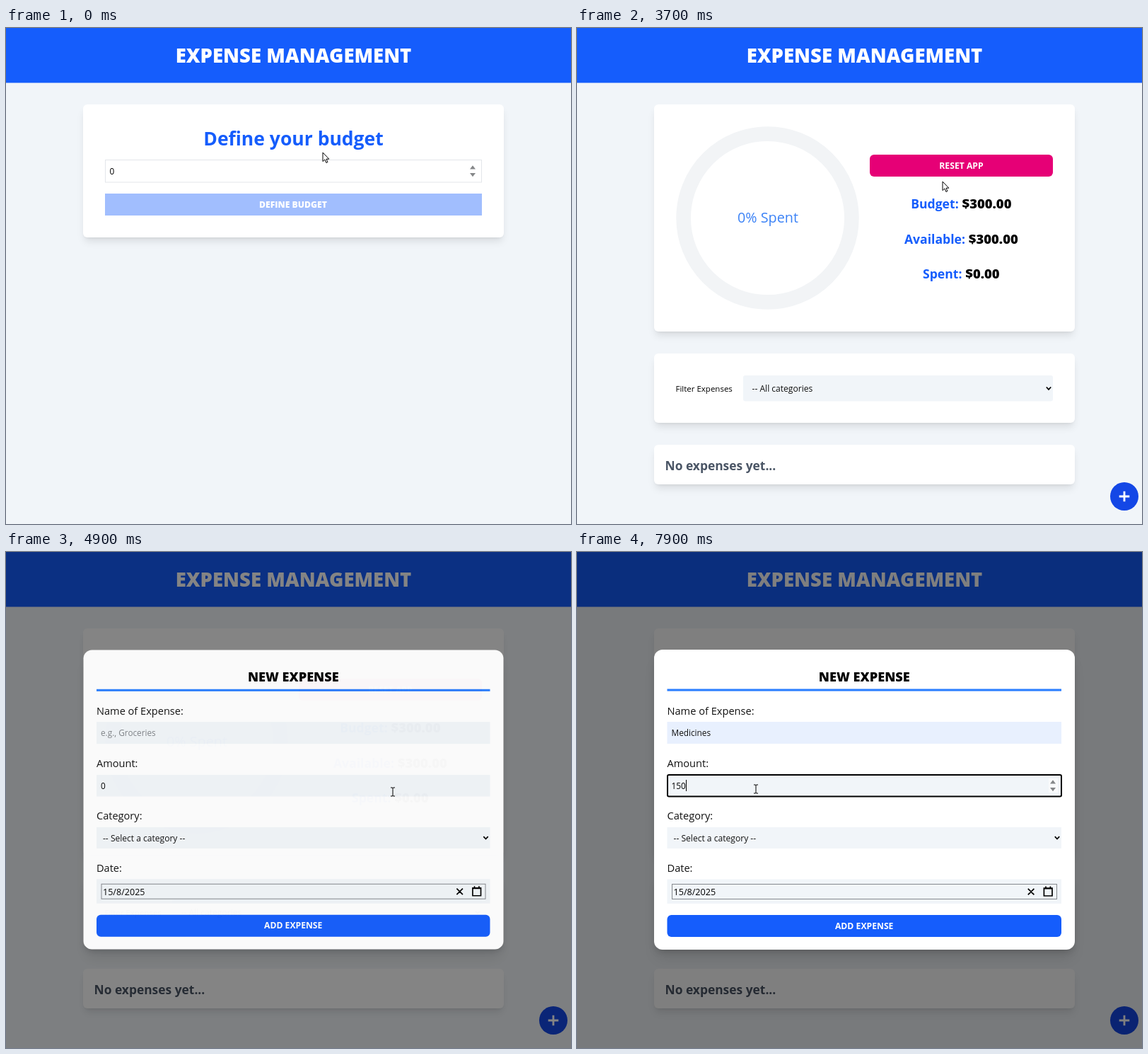
Write an HTML page that moves like this. It is 799 by 701 pixels and loops after 8 s.

```html
<!DOCTYPE html>
<html lang="en">
<head>
<meta charset="utf-8">
<title>Expense Management</title>
<style>
  html, body { margin: 0; width: 100%; height: 100%; overflow: hidden; background: #f1f5f9; }
  #stage { position: relative; width: 799px; height: 701px; overflow: hidden; }
  section, svg, .shade { position: absolute; left: 0; top: 0; width: 799px; height: 701px; }
  .card {
    position: absolute; left: 109px; width: 595px; border-radius: 6px; background: #fff;
    box-shadow: 0 7.8px 11.6px -2.3px #0000001a, 0 3.1px 4.7px -3.1px #0000001a;
  }
  .shade { background: #000; }
  #dialog { transform-origin: 406.5px 350px; }
  #dialog .card {
    border-radius: 12px;
    box-shadow: 0 15px 19px -4px #0000001a, 0 6px 8px -5px #0000001a;
  }
  text { font: 400 11.8px "Open Sans", "Noto Sans", sans-serif; white-space: pre; }
  .mid { text-anchor: middle; }
  .black { font-weight: 800; }
  .bold { font-weight: 700; }
  .h1 { font-size: 27.5px; fill: #fff; }
  .h2 { font-size: 26.5px; fill: #155dfc; }
  .h3 { font-size: 18.2px; }
  .btn { font-size: 12.2px; fill: #fff; }
  .sum { font-size: 18.4px; }
  .sum .bold { font-size: 17.6px; fill: #155dfc; }
  .label { font-size: 14.6px; fill: #111; }
  .opt { font-size: 12.1px; fill: #111; }
  .pop text { font-size: 9.3px; font-weight: 600; fill: #fff; }
  .blue { fill: #155dfc; }
  .field { fill: #f1f5f9; }
  .focus { fill: none; stroke: #000; stroke-width: 2; }
  .line { fill: none; stroke: #000; stroke-width: 1.7; }
  .caret { width: 1px; height: 16px; }
  .spin { fill: #858789; }
  #cursor path { stroke: #000; fill: #fff; stroke-width: 1; stroke-linejoin: round; }
</style>
</head>
<body>
<div id="stage">
  <svg>
    <defs>
      <path id="arrows" d="M-4 -2.7h8L0 -8zM-4 2.7h8L0 8z"/>
      <path id="chevron" d="M-3.2 -1.8L0 1.6 3.2 -1.8"/>
    </defs>
    <rect class="blue" width="799" height="77.5"/>
    <text class="mid black h1" x="406.5" y="49">EXPENSE MANAGEMENT</text>
  </svg>

  <section id="budget">
    <div class="card" style="top:108px;height:188px"></div>
    <svg>
      <text class="mid bold h2" x="406.5" y="166">Define your budget</text>
      <rect x="140.5" y="186.5" width="532" height="31.5" fill="#fff" stroke="#e3e6ea"/>
      <rect id="budgetFocus" class="focus" x="141" y="187" width="531" height="30.5" rx="2"/>
      <text id="budgetText" x="146.5" y="207"></text>
      <rect id="budgetCaret" class="caret" y="194"/>
      <use id="budgetSpin" class="spin" href="#arrows" x="660" y="202.3"/>
      <rect id="define" x="140" y="234" width="533" height="31"/>
      <text class="mid black btn" x="406" y="254">DEFINE BUDGET</text>
    </svg>
  </section>

  <section id="board">
    <div class="card" style="top:108px;height:321px"></div>
    <div class="card" style="top:460px;height:98px"></div>
    <div class="card" style="top:589px;height:56px"></div>
    <svg>
      <circle cx="269.5" cy="268.5" r="118.9" fill="none" stroke="#f2f4f6" stroke-width="20.7"/>
      <text class="mid" x="270" y="274.5" style="font-size:19.8px;fill:#3b82f6">0% Spent</text>
      <rect x="414" y="179" width="259" height="31" rx="6" fill="#e60076"/>
      <text class="mid bold btn" x="543.5" y="199">RESET APP</text>
      <text class="mid black sum" x="543.3" y="255"><tspan class="bold">Budget:</tspan> $300.00</text>
      <text class="mid black sum" x="543.3" y="304.5"><tspan class="bold">Available:</tspan> $300.00</text>
      <text class="mid black sum" x="543.3" y="354"><tspan class="bold">Spent:</tspan> $0.00</text>
      <text x="139.5" y="514" style="font-size:11.5px">Filter Expenses</text>
      <rect class="field" x="235" y="491" width="438" height="36.5" rx="3"/>
      <text class="opt" x="247.5" y="514">-- All categories</text>
      <use class="line" href="#chevron" x="667" y="509.3"/>
      <text class="bold" x="124.5" y="625" style="font-size:17.4px;fill:#4a5565">No expenses yet...</text>
      <circle cx="774" cy="662" r="20" fill="#1447e6"/>
      <path class="line" d="M766.7 662h14.6M774 654.7v14.6" style="stroke:#fff;stroke-width:2.8"/>
    </svg>
  </section>

  <div id="shade" class="shade"></div>

  <section id="dialog">
    <div class="card" style="top:138px;height:424px"></div>
    <svg>
      <text class="mid black h3" x="406.3" y="182.7">NEW EXPENSE</text>
      <rect x="127.5" y="193.5" width="557.5" height="3.1" fill="#2b7fff"/>
      <text class="label" x="127.5" y="229.5">Name of Expense:</text>
      <text class="label" x="127.5" y="304">Amount:</text>
      <text class="label" x="127.5" y="378">Category:</text>
      <text class="label" x="127.5" y="452">Date:</text>

      <rect id="nameField" x="127.5" y="240" width="557.5" height="31"/>
      <rect id="nameFocus" class="focus" x="128" y="240" width="557" height="31" rx="2"/>
      <text id="nameText" x="133.5" y="260.3"></text>
      <rect id="nameCaret" class="caret" y="247.5"/>

      <rect class="field" x="127.5" y="315" width="557.5" height="30.5"/>
      <rect id="amountFocus" class="focus" x="128" y="315" width="557" height="30.5" rx="2"/>
      <text id="amountText" x="133.5" y="334.5"></text>
      <rect id="amountCaret" class="caret" y="322"/>
      <g id="amountSpin">
        <rect x="667" y="320" width="13" height="20" rx="1" fill="#f9fafb"/>
        <use class="spin" href="#arrows" x="673" y="330.2"/>
      </g>

      <rect class="field" x="127.5" y="389" width="557.5" height="30"/>
      <text class="opt" x="136.5" y="409">-- Select a category --</text>
      <use class="line" href="#chevron" x="679" y="404"/>

      <rect class="field" x="127.5" y="462.5" width="557.5" height="34.5"/>
      <rect class="field" x="134.5" y="469.5" width="544" height="21" stroke="#85898e"/>
      <text x="136.5" y="484.8" style="font-size:12.6px">15/8/2025</text>
      <path class="line" d="M637.8 475.8l8.6 8.6m0 -8.6l-8.6 8.6M660.4 475h11.6v11h-11.6zM660 475.6h12.4M663 472.5v2m6.4 -2v2"/>

      <rect class="blue" x="127.5" y="513" width="557.5" height="31" rx="6"/>
      <text class="mid bold btn" x="406.2" y="532.5">ADD EXPENSE</text>
    </svg>
  </section>

  <svg>
    <g id="popup" class="pop">
      <path d="M214 282l7 -6 7 6z" fill="#3b3b3b"/>
      <rect x="206.5" y="281" width="115.5" height="139" rx="5" fill="#3b3b3b"/>
      <rect id="pick" x="206.5" y="285" width="115.5" height="26" fill="#545454"/>
      <text x="215" y="301.5">Medicines</text>
      <text x="215" y="328">Zelvino</text>
      <text x="215" y="354.5">Sushi</text>
      <text x="215" y="381">Taxi</text>
      <path d="M302 295l6.4 6.4m0 -6.4l-6.4 6.4" stroke="#fff" stroke-width="1.3"/>
    </g>
    <g id="cursor">
      <path id="arrow" d="M0 0V12.6L2.9 9.9 4.9 14.5 6.9 13.6 5 9.2H8.8Z"/>
      <path id="beam" d="M-3 -6H-1Q0 -6 0 -5 0 -6 1 -6H3M0 -5V5M-3 6H-1Q0 6 0 5 0 6 1 6H3"/>
      <path id="hand" d="M-1.5 1.2a1.5 1.5 0 0 1 3 0V6.3l1.7 .3 3.6 1q1.3 .5 1.2 2l-.5 4.2 -1.3 3.2H-.4L-4.6 11.6q-1.2 -2 .6 -2.4l2.5 1.6ZM1.5 6.3v3M4 6.8v2.6"/>
    </g>
  </svg>
</div>

<script>
const LOOP = 8000, TICK = 100;
const ui = {};
document.querySelectorAll('[id]').forEach(el => ui[el.id] = el);

// time, x, y, pointer shape
const path = [
  [0, 448, 176, 'arrow'], [100, 400, 193, 'beam'], [200, 373.5, 207, 'beam'],
  [2400, 373.5, 207, 'beam'], [2600, 390, 226, 'arrow'], [2700, 400, 251.5, 'hand'],
  [3100, 398, 250, 'arrow'], [3200, 398, 250, 'arrow'], [3400, 413, 249, 'arrow'],
  [3700, 517, 217, 'arrow'], [3900, 543, 222, 'arrow'], [4100, 610, 530, 'arrow'],
  [4200, 650, 588, 'arrow'], [4400, 770, 656, 'hand'], [4600, 770, 656, 'hand'],
  [4700, 731, 596, 'arrow'], [4900, 547, 339, 'beam'], [5000, 300, 262, 'beam'],
  [5100, 225, 258, 'beam'], [5300, 245, 298, 'arrow'], [6000, 245, 300, 'arrow'],
  [6200, 257, 319, 'arrow'], [6300, 253, 335, 'beam'], [LOOP, 253, 335, 'beam']
];
const budgetTyping = [[0, '0'], [1800, '3'], [1900, '30'], [2100, '300']];
const nameTyping = [[0, 'e.g., Groceries'], [5300, 'Medicines']];
const amountTyping = [[0, '0'], [6700, ''], [7400, '1'], [7800, '15'], [7900, '150']];

const clamp = v => Math.min(1, Math.max(0, v));
const show = (el, on) => el.style.display = on ? '' : 'none';
const latest = (list, t) => list.filter(e => e[0] <= t).pop();

function input(name, value, focused, empty) {
  const text = ui[name + 'Text'], caret = ui[name + 'Caret'];
  text.textContent = value;
  show(ui[name + 'Focus'], focused);
  show(caret, focused);
  const width = empty || !value ? 0 : text.getComputedTextLength();
  caret.setAttribute('x', Math.round(+text.getAttribute('x') + width));
}

function moveCursor(t) {
  const i = path.findLastIndex(p => p[0] <= t);
  const a = path[i], b = path[i + 1];
  const k = (t - a[0]) / (b[0] - a[0]);
  const x = a[1] + (b[1] - a[1]) * k, y = a[2] + (b[2] - a[2]) * k;
  ui.cursor.setAttribute('transform', `translate(${x} ${y})`);
  for (const shape of ['arrow', 'beam', 'hand']) show(ui[shape], shape === a[3]);
}

function draw(t) {
  show(ui.budget, t < 3100);
  show(ui.board, t >= 3100);
  input('budget', latest(budgetTyping, t)[1], t >= 500 && t < 2900);
  show(ui.budgetSpin, t < 2900);
  ui.define.setAttribute('fill', t < 1800 ? '#a1befe' : t < 2700 ? '#155dfc' : '#1447e6');

  const open = 1 - (1 - clamp((t - 4700) / 300)) ** 3;
  show(ui.dialog, open > 0);
  ui.shade.style.opacity = open / 2;
  ui.dialog.style.opacity = open;
  ui.dialog.style.transform = `scale(${0.95 + 0.05 * open})`;

  const filled = t >= 5300;
  input('name', latest(nameTyping, t)[1], t >= 5100 && t < 6400, !filled);
  ui.nameText.setAttribute('fill', !filled ? '#808488' : t < 5900 ? '#555' : '#111');
  ui.nameField.setAttribute('fill', filled ? '#e8f0fe' : '#f1f5f9');
  input('amount', latest(amountTyping, t)[1], t >= 6400);
  show(ui.amountSpin, t >= 6300);

  ui.popup.style.opacity = t < 5200 ? 0 : clamp((6220 - t) / 220);
  show(ui.pick, t >= 5300);
  moveCursor(t);
}

const start = performance.now();
function frame() {
  const t = (performance.now() - start) % LOOP;
  draw(Math.floor(t / TICK) * TICK);
  requestAnimationFrame(frame);
}
frame();
</script>
</body>
</html>
```
